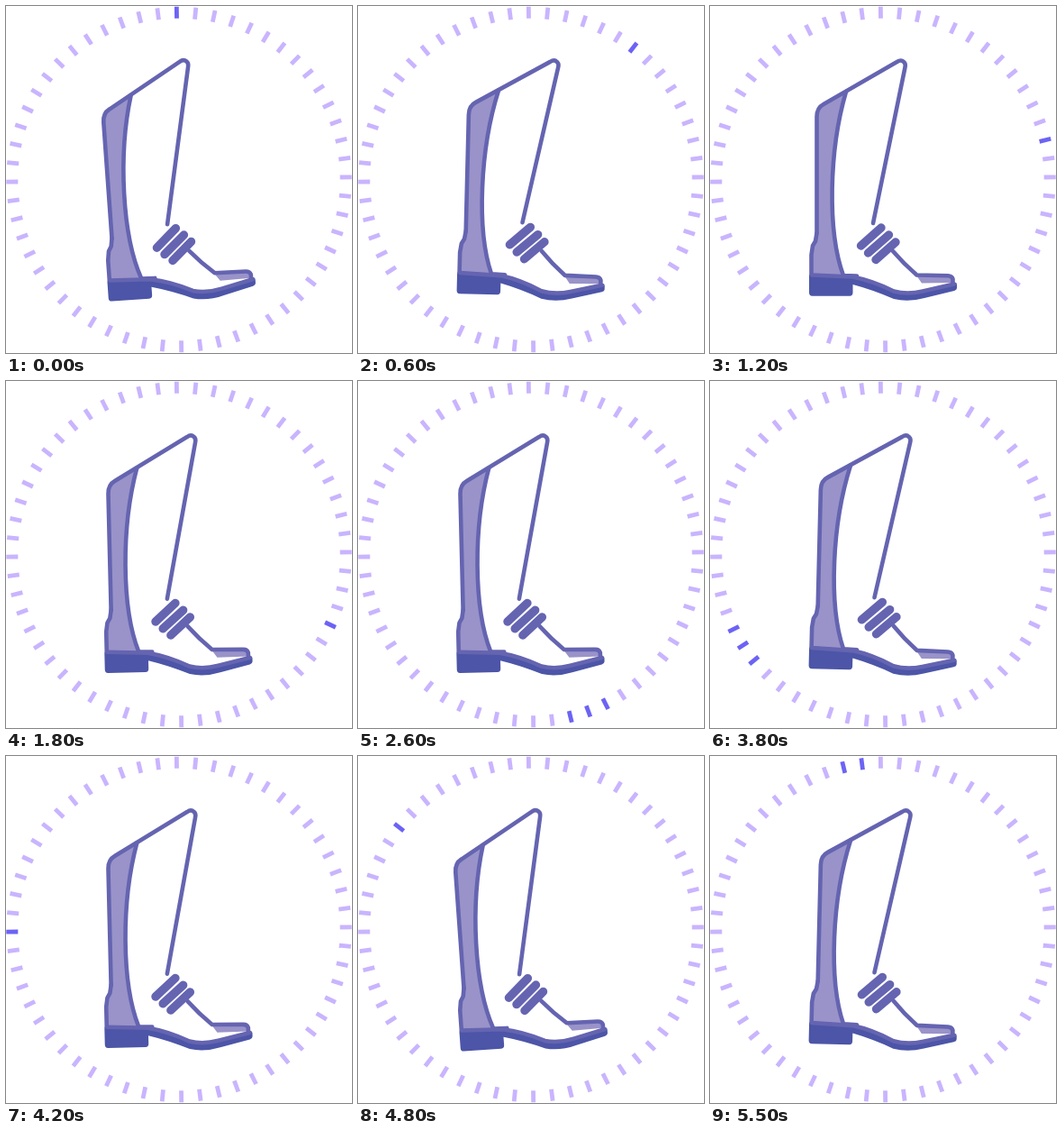
Recreate the animation shown at these times as an HTML page. Size 384 by 385 pixels, loop 5.6 s.

```html
<!DOCTYPE html>
<html lang="en">
<head>
<meta charset="utf-8">
<title>Rocking boot timer</title>
<style>
  html, body { margin: 0; width: 100%; height: 100%; overflow: hidden; background: #fff; }
  svg { display: block; width: 100vw; height: 100vh; }
  .line { fill: none; stroke: #6564b1; stroke-width: 4.6; stroke-linecap: round; stroke-linejoin: round; }
  .panel { fill: #9993c9; }
  .sole { fill: #4c55a7; }
  .lace { stroke-width: 9.4; }
  #ring line { stroke: #c9b4fe; stroke-width: 4.8; }
  #ring line.on { stroke: #6c63f5; }
</style>
</head>
<body>
<svg viewBox="0 0 384 385">
  <g id="ring"></g>
  <g id="boot">
    <path class="panel" d="M118.5 252V123Q118.500 113 126 109L151 95C132 160 130 250 148 299L112.500 298V275L115 262Z"/>
    <path class="panel" d="M229 299L265 299.500Q269 300 269.500 307L235 307.500Z"/>
    <path class="line" d="M118.500 252V123Q118.500 113 126 109L207.500 62Q212 59 215 62Q217.500 64 216.500 68L181 241"/>
    <path class="line" d="M151 95C132 160 130 250 148 299L163 299.500"/>
    <path class="line" d="M118.500 252L117 261L114 266L112.500 276V298"/>
    <path class="line" d="M203 272Q215 286 229.500 298.500L264 299.300Q268.500 299.500 269.500 303V308"/>
    <path class="sole" d="M110 300Q110 297 113 297L158 299Q180 303 204 315Q219 319 236 315L270 307Q274 306 274 309V313Q274 315 271 316L238 324Q220 329 204 325Q181 315 158.500 309V318Q158.500 321.700 155 321.700H113.500Q110 321.700 110 318Z"/>
    <path class="line" d="M113 298.500L158 300.500Q180 304.500 204 316.500Q219 320.500 236 316.500L271 308.500"/>
    <path class="line lace" d="M167.500 266L190 246M175.500 274L198.500 254M184 281.500L206 262"/>
  </g>
</svg>
<script>
const STEP = 100, TICKS = 56, GROUP = 6;
// Each pose is held for two steps: [dx, dy, degrees around the laces].
const POSES = [[-0.3, 0.8, -4.1], [-1.6, 0.5, -1.4], [0, 0, 0], [0.9, -0.7, 1.4]];

const ring = document.getElementById('ring');
const boot = document.getElementById('boot');

const ticks = Array.from({ length: TICKS }, (_, i) => {
  const tick = document.createElementNS('http://www.w3.org/2000/svg', 'line');
  tick.setAttribute('y1', -191.7);
  tick.setAttribute('y2', -178.7);
  tick.setAttribute('transform', `translate(192 192.500) rotate(${i * 360 / TICKS - 0.8})`);
  return ring.appendChild(tick);
});

function draw(now) {
  const step = Math.floor(now / STEP) % TICKS;
  const start = step - step % GROUP;
  ticks.forEach((tick, i) => tick.classList.toggle('on', i >= start && i <= step));

  const [dx, dy, angle] = POSES[Math.floor(step / 2) % POSES.length];
  boot.setAttribute('transform', `translate(${dx} ${dy}) rotate(${angle} 187 264)`);
}

let origin;
function frame(now) {
  origin ??= now;
  draw(now - origin);
  requestAnimationFrame(frame);
}
draw(0);
requestAnimationFrame(frame);
</script>
</body>
</html>
```
